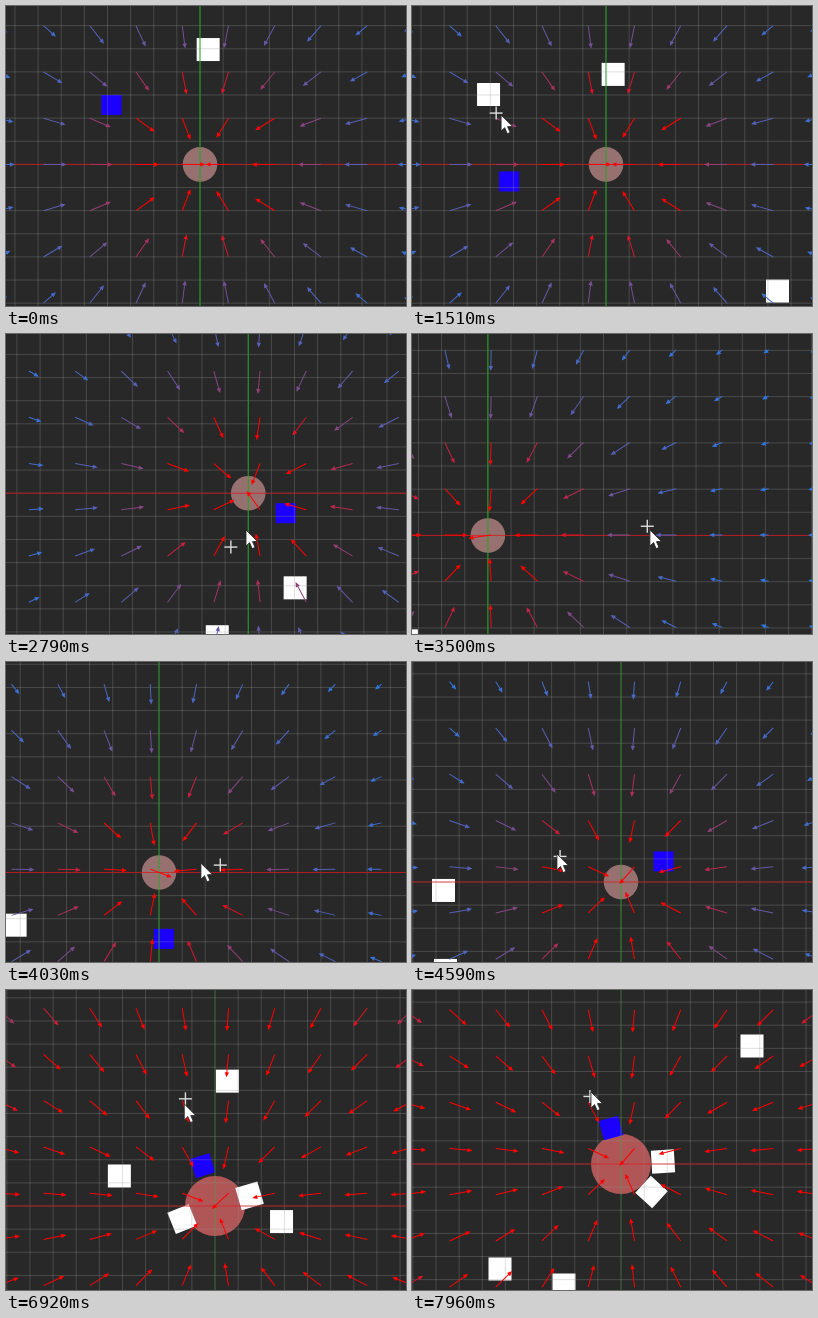
Animation, 400 px wide and 300 px high, one loop 8 s. Source, as an HTML page with a canvas:

```html
<!DOCTYPE html>
<html>
<head>
<meta charset="utf-8">
<title>Gravity field</title>
<style>
  html, body { margin: 0; width: 100%; height: 100%; overflow: hidden; background: #282828; }
  canvas { display: block; }
</style>
</head>
<body>
<canvas id="stage" width="400" height="300"></canvas>
<script>
const ctx = document.getElementById('stage').getContext('2d');
const LOOP = 8000, CELL = 23.13, SPACING = 46.25, LAG = 50;

// Keys are [time, x, y]; bodies are placed relative to the planet.
const camera = [
  [1720, 194, 158.4], [2600, 289, 91], [2790, 242.5, 159], [3400, 87, 207.5],
  [3500, 76, 201.5], [3600, 65, 195.5], [4350, 209, 220], [6700, 209, 220], [7700, 209, 174]
];
const pointer = [
  [60, -30, 90], [1510, 89, 109], [2790, 240, 196], [3500, 238, 196], [4590, 145, 192],
  [4900, 135, 160], [6150, 191, 74], [7500, 170, 140], [7960, 179, 102]
];
const player = [
  [0, -88.5, -59.5], [800, -112, -20], [1510, -97, 17], [2200, -30, 60], [2790, 37.5, 20],
  [3500, -30, 125], [4590, 42.5, -20.5], [6150, -33.5, -79], [7000, -10, -36]
];
const orbiters = [
  [[0, 8, -115], [860, 150, 15], [1510, 171.5, 126.5], [1700, 171, 165]],
  [[60, -210, -60], [1510, 7, -90], [2200, 85, 0], [2790, 47, 94.5], [3500, -40, 140],
   [4590, -175.5, 88.5], [6150, -85.5, -84], [7960, -121, 105]],
  [[1400, -119, -74], [1510, -117.5, -70], [2790, -31, 143.5], [4590, -177.5, 8.5],
   [6150, -23, -30], [7960, -57, 121]]
];
const lateBoxes = [
  [[4900, -75, -55], [5900, 18.5, -26.5], [6150, 18.5, -26.5], [7200, 42, -2.5]],
  [[5300, -85, -95], [6150, 58, -51], [6700, 72, 5], [7500, 30.5, 28]],
  [[6900, 10, -125], [7960, 131, -118]]
];

const clamp = value => Math.max(0, Math.min(1, value));

// Smooth interpolation that stays flat at turning points and pauses.
function track(keys, time) {
  const last = keys.length - 1;
  if (time <= keys[0][0]) return keys[0].slice(1);
  if (time >= keys[last][0]) return keys[last].slice(1);
  const i = keys.findIndex(key => key[0] > time) - 1;
  const span = keys[i + 1][0] - keys[i][0];
  const u = (time - keys[i][0]) / span;
  const rate = (k, c) => (keys[k + 1][c] - keys[k][c]) / (keys[k + 1][0] - keys[k][0]);
  const slope = (k, c) => {
    if (k === 0) return rate(0, c);
    if (k === last) return rate(last - 1, c);
    const before = rate(k - 1, c), after = rate(k, c);
    return before * after <= 0 ? 0 : (before + after) / 2;
  };
  return keys[i].slice(1).map((from, n) => {
    const c = n + 1, to = keys[i + 1][c];
    return from + (to - from) * u * u * (3 - 2 * u)
      + span * u * (1 - u) * ((1 - u) * slope(i, c) - u * slope(i + 1, c));
  });
}

function line(x1, y1, x2, y2, color) {
  ctx.strokeStyle = color;
  ctx.beginPath();
  ctx.moveTo(x1, y1);
  ctx.lineTo(x2, y2);
  ctx.stroke();
}

function polygon(points, color) {
  ctx.fillStyle = color;
  ctx.beginPath();
  points.forEach(([x, y]) => ctx.lineTo(x, y));
  ctx.closePath();
  ctx.fill();
}

// Boxes touching the planet tilt, and lie flat on it once it is heavy.
function tilt(x, y, radius, mass) {
  const contact = clamp((radius + 25 - Math.hypot(x, y)) / 4);
  const quarter = Math.PI / 2, radial = Math.atan2(y, x);
  const flat = radial - Math.round(radial / quarter) * quarter;
  return contact * (-0.47 * Math.sign(x) * (1 - mass) + flat * mass);
}

function square([x, y], size, color, [ox, oy], angle) {
  ctx.save();
  ctx.translate(ox + x, oy + y);
  ctx.rotate(angle);
  ctx.fillStyle = color;
  ctx.fillRect(-size / 2, -size / 2, size, size);
  ctx.restore();
}

function drawGrid([ox, oy], green) {
  const color = 'rgba(150,150,150,.3)';
  for (let x = ox % CELL; x < 400; x += CELL) line(x, 0, x, 300, color);
  for (let y = oy % CELL; y < 300; y += CELL) line(0, y, 400, y, color);
  line(0, oy, 400, oy, 'rgba(225,10,15,.7)');
  line(ox, 0, ox, 300, `rgba(30,165,30,${green})`);
}

function drawArrow(x, y, [ox, oy], redRadius) {
  const dx = ox - x, dy = oy - y, distance = Math.hypot(dx, dy) || 1;
  const heat = Math.min(1, (redRadius / distance) ** 2);
  const length = 23 * Math.min(1, (redRadius * 2.02 / distance) ** 2);
  const mix = (cold, hot) => Math.round(cold + (hot - cold) * heat);
  const color = `rgb(${mix(28, 255)},${mix(130, 0)},${mix(245, 0)})`;
  ctx.save();
  ctx.translate(x, y);
  ctx.rotate(Math.atan2(dy, dx));
  line(0, 0, length - 3, 0, color);
  polygon([[length, 0], [length - 5, -2.2], [length - 5, 2.2]], color);
  ctx.restore();
}

function drawPointer([x, y], [cx, cy]) {
  ctx.lineWidth = 1.4;
  line(cx - 6.5, cy, cx + 6.5, cy, '#ddd');
  line(cx, cy - 6.5, cx, cy + 6.5, '#ddd');
  ctx.save();
  ctx.translate(x, y);
  polygon([[0, 0], [0, 16], [3.6, 12.6], [6.2, 18.6], [9, 17.4], [6.5, 11.6], [11.4, 11.4]], '#fff');
  ctx.lineWidth = .8;
  ctx.strokeStyle = '#222';
  ctx.stroke();
  ctx.restore();
}

function draw(time) {
  const origin = track(camera, time);
  const previous = track(camera, time - LAG);
  const shift = origin.map((value, i) => value - previous[i]);
  const mass = clamp((time - 6200) / 700);
  const radius = 17.3 + 12.7 * mass;

  ctx.fillStyle = '#282828';
  ctx.fillRect(0, 0, 400, 300);

  ctx.fillStyle = `rgb(${151 + 25 * mass},${112 - 26 * mass},${112 - 25 * mass})`;
  ctx.beginPath();
  ctx.arc(origin[0], origin[1], radius, 0, 2 * Math.PI);
  ctx.fill();

  const drawBody = (keys, size, color) => {
    const place = track(keys, time);
    square(place, size, color, origin, tilt(...place, radius, mass));
  };
  for (const keys of [...orbiters, ...lateBoxes]) {
    const leaves = keys === orbiters[0] && time > keys[keys.length - 1][0];
    if (time >= keys[0][0] && !leaves) drawBody(keys, 23, '#fff');
  }
  drawBody(player, 20, '#1c00ff');

  ctx.lineWidth = 1;
  drawGrid(origin, 0.95 - 0.6 * clamp((time - 3500) / 2500));
  for (let col = -1; col < 10; col++) {
    for (let row = -1; row < 8; row++) {
      drawArrow(37.5 + col * SPACING + shift[0], 19.7 + row * SPACING + shift[1],
        origin, 88 + 142 * mass);
    }
  }

  const cross = track(pointer, time - LAG).map((value, i) => value + shift[i]);
  drawPointer(track(pointer, time), cross);
}

function frame() {
  draw(performance.now() % LOOP);
  requestAnimationFrame(frame);
}
frame();
</script>
</body>
</html>
```
